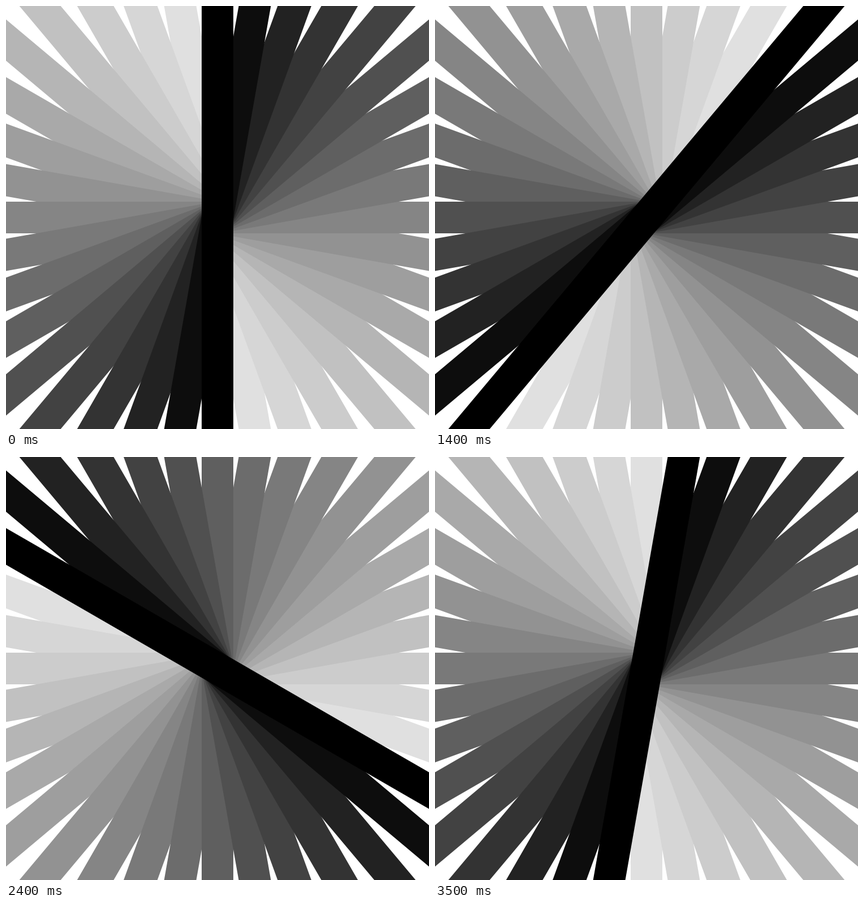
Animation, 748 px wide and 748 px high, one loop 3600 ms. Source, as an HTML page with a canvas:

```html
<!DOCTYPE html>
<html lang="en">
<head>
<meta charset="utf-8">
<title>Rotating bars</title>
<style>
  html, body { margin: 0; width: 100%; height: 100%; overflow: hidden; background: #fff; }
  canvas { display: block; }
</style>
</head>
<body>
<canvas id="stage" width="748" height="748"></canvas>
<script>
const SIZE = 748, BAR = 56, LENGTH = 1200, STEP_MS = 100;
// Grey levels from the leading bar to the end of its trail
const greys = [0, 13, 34, 51, 66, 80, 95, 108, 121, 133, 146, 158, 169, 181, 193, 204, 214, 224];
const turn = Math.PI / greys.length;
const ctx = document.getElementById('stage').getContext('2d');

function drawBar(angle, grey) {
  ctx.save();
  ctx.translate(SIZE / 2, SIZE / 2);
  ctx.rotate(angle);
  ctx.fillStyle = `rgb(${grey}, ${grey}, ${grey})`;
  ctx.fillRect(-BAR / 2, -LENGTH / 2, BAR, LENGTH);
  ctx.restore();
}

function draw() {
  const step = Math.floor(performance.now() / STEP_MS) % greys.length;
  ctx.fillStyle = '#fff';
  ctx.fillRect(0, 0, SIZE, SIZE);
  // Lightest first, so each darker bar lies on top
  for (let i = greys.length - 1; i >= 0; i--) drawBar((i - step) * turn, greys[i]);
  requestAnimationFrame(draw);
}
draw();
</script>
</body>
</html>
```
